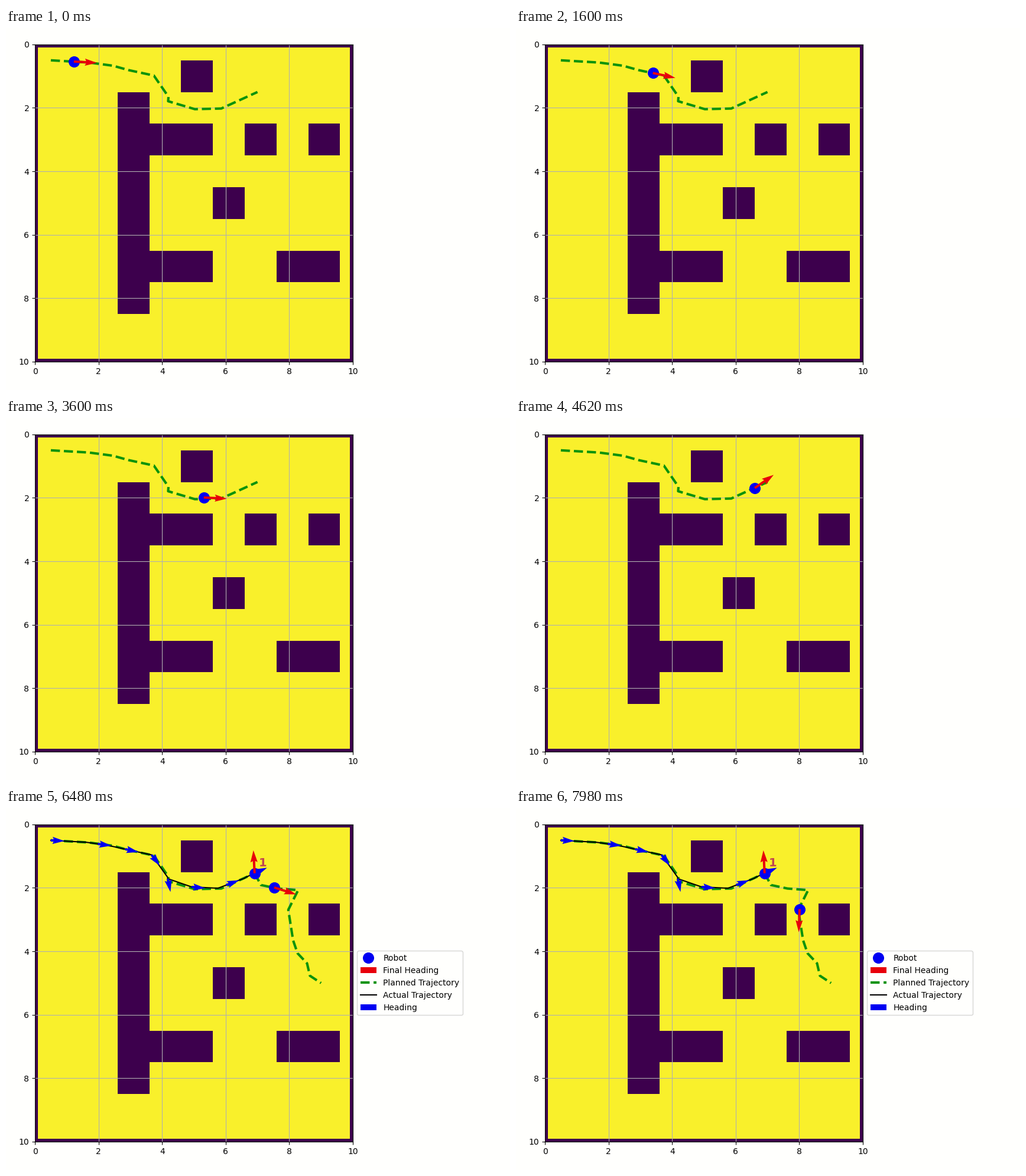
These frames come from a looping animation (853 by 614 pixels, 8000 ms). A matplotlib script:

```python
import numpy as np
import matplotlib.pyplot as plt
from matplotlib.animation import FuncAnimation
from matplotlib.lines import Line2D
from matplotlib.patches import Patch, Rectangle

W, H, DPI = 853, 614, 100
LEFT, TOP, SIDE = 49.0, 27.9, 538
LOOP, INTERVAL = 8000, 40
PAPER, FREE, WALL = "#fffffd", "#f9f02b", "#3d004d"
BLUE, RED, GREEN, LABEL = "#0000f2", "#e8000a", "#0a930c", "#c04850"
ARRIVED, REPLANNED = 5180, 5460
ARROW, SMALL_ARROW = 39, 23
TURN_RATE = 0.352  # degrees per ms

# column, row, columns, rows
BLOCKS = [(2, 1, 1, 7), (3, 2, 2, 1), (3, 6, 2, 1), (4, 0, 1, 1),
          (6, 2, 1, 1), (8, 2, 1, 1), (5, 4, 1, 1), (7, 6, 2, 1)]

PLAN_A = [(0.5, 0.5), (1.7, 0.57), (2.45, 0.67), (2.95, 0.81), (3.74, 0.98),
          (4.2, 1.65), (4.19, 1.79), (5.03, 2.04), (5.86, 2.02), (7, 1.5)]
PLAN_B = [(6.91, 1.54), (7.11, 1.91), (7.63, 2.02), (8.28, 2.07), (7.97, 2.69),
          (8.12, 3.65), (8.26, 4.06), (8.56, 4.38), (8.65, 4.77), (9, 5)]

# arrival time in ms, x, y
STOPS_A = [(-480, 0.5, 0.5), (250, 1.6, 0.56), (800, 2.25, 0.65), (1790, 3.67, 0.96),
           (2530, 4.17, 1.66), (2650, 4.18, 1.71), (3350, 4.93, 1.97),
           (3830, 5.74, 2.01), (4000, 5.76, 2.01), (4560, 6.6, 1.69),
           (4680, 6.62, 1.67), (4970, 6.91, 1.54)]
STOPS_B = [(5460, 6.91, 1.54), (5900, 7.09, 1.85), (6590, 7.63, 2.02),
           (7100, 8.2, 2.06), (7850, 8.01, 2.67)]
POSE_TIMES = [-480, 577, 1218, 1905, 2650, 3390, 4215, 4970]


def follow(stops, deg, last_deg):
    """At each stop turn on the spot at a fixed rate, then drive straight on."""
    stops = np.array(stops)
    step = np.diff(stops[:, 1:], axis=0)
    headings = [*np.degrees(np.arctan2(step[:, 1], step[:, 0])), last_deg]
    keys = []
    for (t, x, y), heading in zip(stops, headings):
        keys += [(t, x, y, deg), (t + abs(heading - deg) / TURN_RATE, x, y, heading)]
        deg = heading
    return np.array(keys)


RUN_A = follow(STOPS_A, 3, -93)
RUN_B = follow(STOPS_B, 0, 92)


def pose(run, t):
    return [np.interp(t, run[:, 0], run[:, k]) for k in (1, 2, 3)]


def vector(deg, length):
    a = np.radians(deg)
    return length * np.cos(a), -length * np.sin(a)


def arrows(x, y, deg, length, color, z):
    return ax.quiver(x, y, *vector(deg, length), color=color, units="dots", width=4.04,
                     scale_units="dots", scale=1, zorder=z)


def robot(x, y, z):
    return ax.plot([x], [y], "o", color=BLUE, ms=12.7, zorder=z)[0]


def plan(points):
    return ax.plot(*zip(*points), "--", color=GREEN, lw=3, zorder=2)[0]


plt.rcParams["font.family"] = "DejaVu Sans"
# the tiny surplus keeps the pixel size from being truncated
fig = plt.figure(figsize=((W + 1e-6) / DPI, (H + 1e-6) / DPI), dpi=DPI, facecolor=PAPER)
ax = fig.add_axes([LEFT / W, 1 - (TOP + SIDE) / H, SIDE / W, SIDE / H], facecolor=FREE)
ax.set(xlim=(0, 10), ylim=(10, 0), xticks=range(0, 11, 2), yticks=range(0, 11, 2))
ax.grid(True)
ax.add_patch(Rectangle((0, 0), 10, 10, fill=False, ec=WALL, lw=7.2))
for col, row, w, h in BLOCKS:
    ax.add_patch(Rectangle((col + 0.6, row + 0.5), w, h, fc=WALL, lw=0, antialiased=False))

plan(PLAN_A)
next_plan = plan(PLAN_B)

# everything shown once the first goal is reached
goal = RUN_A[-1, 1:]
legend = ax.legend(
    handles=[
        Line2D([], [], marker="o", ls="none", color=BLUE, ms=12.7, label="Robot"),
        Patch(fc=RED, lw=0, label="Final Heading"),
        Line2D([], [], ls="--", lw=3, color=GREEN, label="Planned Trajectory"),
        Line2D([], [], lw=1.5, color="black", label="Actual Trajectory"),
        Patch(fc=BLUE, lw=0, label="Heading"),
    ],
    loc="center left", bbox_to_anchor=(1, 0.5), facecolor=PAPER)
results = [
    ax.plot(RUN_A[:, 1], RUN_A[:, 2], color="black", lw=1.5, zorder=2.5)[0],
    arrows(*pose(RUN_A, POSE_TIMES), SMALL_ARROW, BLUE, 2.7),
    robot(*goal[:2], 3),
    arrows(*goal, ARROW, RED, 3.2),
    ax.text(7.05, 1.33, "1", color=LABEL, size=14, weight="bold", zorder=3.4),
    legend,
]

body = robot(*goal[:2], 4)
nose = arrows(*goal, ARROW, RED, 5)


def update(i):
    t = i * INTERVAL
    x, y, deg = pose(RUN_A if t < REPLANNED else RUN_B, t)
    body.set_data([x], [y])
    nose.set_offsets([[x, y]])
    nose.set_UVC(*vector(deg, ARROW))
    for artist in results:
        artist.set_visible(t >= ARRIVED)
    next_plan.set_visible(t >= REPLANNED)
    return [body, nose, next_plan, *results]


anim = FuncAnimation(fig, update, frames=LOOP // INTERVAL, interval=INTERVAL,
                     repeat=True, repeat_delay=0, blit=False)
plt.show()
```
